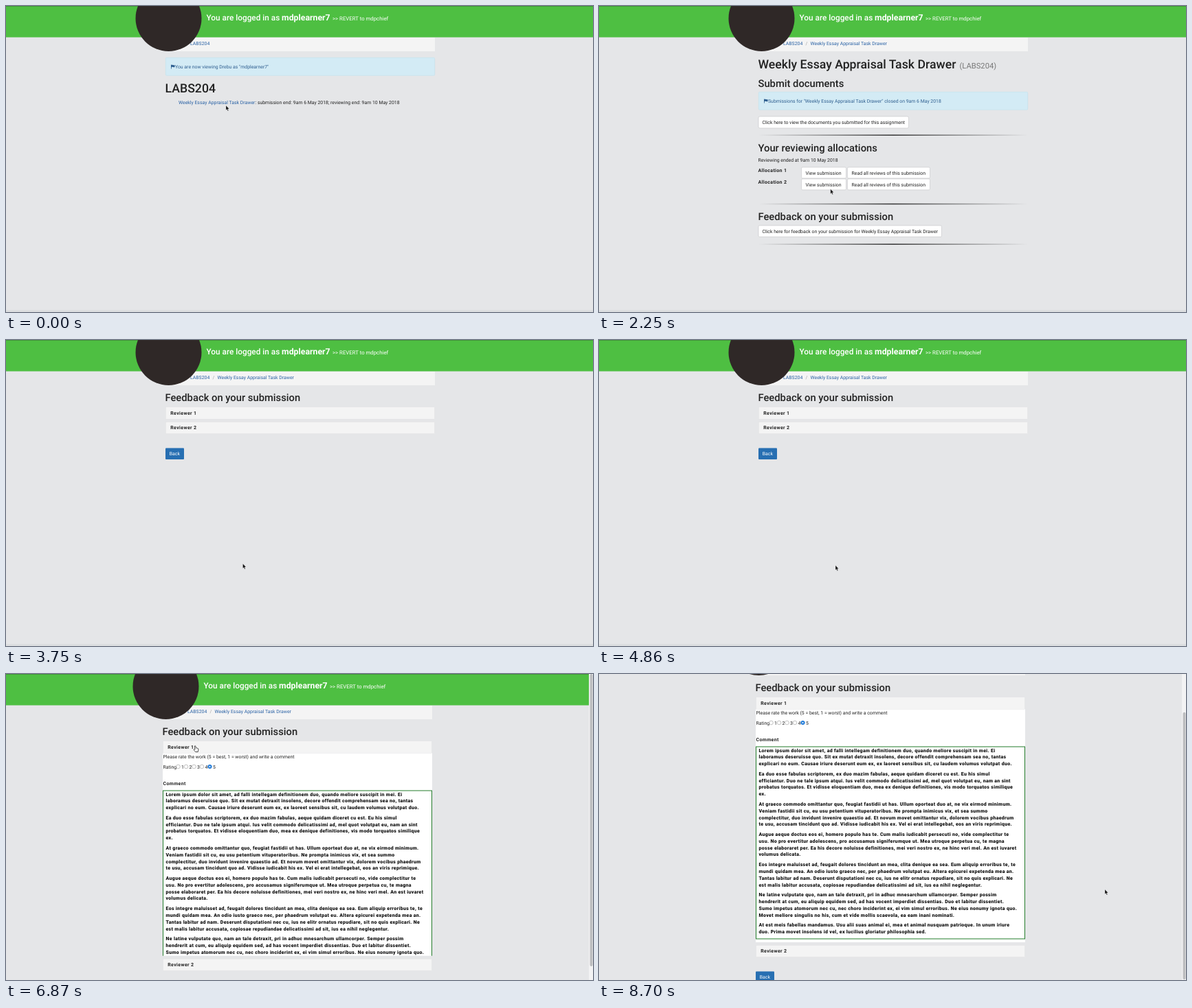
These frames come from a looping animation (854x446 px, 8.73 s). An HTML page:

```html
<!DOCTYPE html>
<html lang="en">
<head>
<meta charset="utf-8">
<style>
html, body { margin: 0; width: 100%; height: 100%; overflow: hidden; background: #e5e6e8; }
svg { display: block; }
text { font: 6.9px Roboto, sans-serif; fill: #222; text-rendering: geometricPrecision; white-space: pre; }
.h1 { font-size: 17.7px; font-weight: 500; }
.h2 { font-size: 14.75px; font-weight: 500; }
.small { font-size: 11.2px; fill: #777; }
.bold { font-size: 7px; font-weight: 700; letter-spacing: .35px; }
.link { fill: #2a62a5; }
.hover { fill: #23527c; text-decoration: underline; }
.note { fill: #2f5f90; }
.head { font-size: 11.8px; font-weight: 500; fill: #fff; }
.user { font-size: 12.3px; font-weight: 700; fill: #fff; }
.revert { font-size: 7.8px; fill: #fff; }
.white { fill: #fff; }
.essay text { font-size: 7px; font-weight: 900; letter-spacing: .31px; fill: #111; }
.alert { fill: #d3ebf5; stroke: #bfe1ec; stroke-width: .6; }
.bar { fill: #f4f4f4; stroke: #e0e0e2; stroke-width: .5; }
.btn { fill: #fff; stroke: #c4c4c6; stroke-width: .6; }
.pressed { fill: #e2e2e2; stroke: #adadad; }
</style>
</head>
<body>
<svg width="854" height="446" viewBox="0 0 854 446">
  <defs>
    <linearGradient id="fade">
      <stop offset="0" stop-color="#333" stop-opacity="0"/>
      <stop offset=".5" stop-color="#333"/>
      <stop offset="1" stop-color="#333" stop-opacity="0"/>
    </linearGradient>
    <path id="flag" d="M0 0h.8v.5q1.2-.7 2.4 0t2.3 0v3q-1.2.6-2.3 0t-2.4 0v2.5h-.8z" fill="#2f5f90"/>
  </defs>
  <rect width="854" height="446" fill="#e5e6e8"/>
  <rect id="foot" y="443" width="854" height="3" fill="#dcdee0"/>

  <g id="scene">
    <rect x="232" y="46" width="392" height="20" fill="#f4f4f4"/>
    <text x="268" y="57.3" class="link">LABS204</text>
    <g id="crumb">
      <text x="300.5" y="57.3" fill-opacity=".4">/</text>
      <text x="307.5" y="57.3" class="link">Weekly Essay Appraisal Task Drawer</text>
    </g>
    <rect x="-10" width="874" height="45.6" fill="#4ebf42"/>
    <rect x="-10" width="874" height="1" fill="#43913b"/>
    <circle cx="236.5" cy="18" r="48" fill="#2f2827"/>
    <text x="291.5" y="20.5" class="head">You are logged in as</text>
    <text x="401" y="20.5" class="user">mdplearner7</text>
    <text x="475" y="20.5" class="revert">&gt;&gt; REVERT to mdpchief</text>

    <g id="course">
      <rect x="232.3" y="75.3" width="391.4" height="26" rx="1.5" class="alert"/>
      <use href="#flag" x="240" y="85.5"/>
      <text x="246" y="91.2" class="note">You are now viewing Drebu as "mdplearner7"</text>
      <text x="231.5" y="126.3" class="h1">LABS204</text>
      <text x="251" y="142.5" class="link" id="task">Weekly Essay Appraisal Task Drawer</text>
      <text x="362.5" y="142.5">: submission end: 9am 6 May 2018; reviewing end: 9am 10 May 2018</text>
    </g>

    <g id="assignment">
      <text x="231.5" y="91.3" class="h1">Weekly Essay Appraisal Task Drawer</text>
      <text x="524.5" y="91.3" class="small">(LABS204)</text>
      <text x="231.5" y="118.3" class="h2">Submit documents</text>
      <rect x="232.3" y="125.3" width="391.4" height="26" rx="1.5" class="alert"/>
      <use href="#flag" x="240" y="135.5"/>
      <text x="246" y="141.2" class="note">Submissions for "Weekly Essay Appraisal Task Drawer" closed on 9am 6 May 2018</text>
      <rect x="232" y="161" width="218.5" height="17" rx="2" class="btn"/>
      <text x="237.5" y="172">Click here to view the documents you submitted for this assignment</text>
      <text x="231.5" y="212.3" class="h2">Your reviewing allocations</text>
      <text x="231.5" y="227.4">Reviewing ended at 9am 10 May 2018</text>
      <g id="allocations"></g>
      <text x="231.5" y="312.3" class="h2">Feedback on your submission</text>
      <rect x="232" y="320" width="266.5" height="16.5" rx="1.5" class="btn" id="feedbackBtn"/>
      <text x="237.5" y="330.8">Click here for feedback on your submission for Weekly Essay Appraisal Task Drawer</text>
      <g fill="url(#fade)">
        <rect x="232" y="187.5" width="392" height="1.5"/>
        <rect x="232" y="287.8" width="392" height="1.5"/>
        <rect x="232" y="346.5" width="392" height="1.5"/>
      </g>
    </g>

    <g id="feedback">
      <text x="231.5" y="89.3" class="h2">Feedback on your submission</text>
      <svg id="panel" x="232" y="115" width="392" height="0">
        <rect width="392" height="340" fill="#fff"/>
        <text x=".5" y="8">Please rate the work (5 = best, 1 = worst) and write a comment</text>
        <text x=".5" y="22.5">Rating</text>
        <g id="rating"></g>
        <text x=".5" y="47.3" class="bold">Comment</text>
        <rect x=".5" y="55" width="391" height="280" fill="none" stroke="#237c2b"/>
        <g id="essay" class="essay"></g>
      </svg>
      <rect x="232.3" y="97.8" width="391.4" height="17.4" class="bar"/>
      <text x="239.3" y="108.8" class="bold">Reviewer 1</text>
      <g id="below">
        <rect x="232.3" y="119.3" width="391.4" height="17.4" class="bar"/>
        <text x="239.3" y="130.4" class="bold">Reviewer 2</text>
        <rect x="232" y="157.5" width="27" height="16.5" rx="1" fill="#276fb2"/>
        <text x="237.8" y="168.2" class="white">Back</text>
      </g>
    </g>
  </g>

  <g id="scrollbar">
    <rect x="848" width="6" height="446" fill="#f3f3f4"/>
    <rect id="thumb" x="849.5" width="4" rx="2" fill="#bdbec0"/>
  </g>
  <g id="ripple">
    <circle r="15.5" fill="#000" fill-opacity=".08"/>
    <circle r="9" fill="#000" fill-opacity=".06"/>
    <g id="flash">
      <circle r="16" fill="#f6f6f6" stroke="#000" stroke-opacity=".22" stroke-width="2"/>
      <circle r="8.5" fill="#dcdcdc"/>
    </g>
  </g>
  <g id="cursor">
    <path id="arrow" d="M0 0V6.8L1.5 5.4 2.6 7.9 3.7 7.4 2.7 5H4.7Z" fill="#111" stroke="#fff" stroke-width=".3"/>
    <path id="hand" d="M-1.2.6Q-.4-.6.3.6L1 3.2 3.5 3.8Q4.6 4.2 4.4 5.6L3.7 9H.2L-2.5 5.8Q-2.3 4.5-.4 5.4Z" fill="#fff" stroke="#222" stroke-width=".8"/>
  </g>
</svg>
<script>
const LOOP = 8730, PANEL = 340, VIEW = 446;
const $ = id => document.getElementById(id);
const show = (id, on) => $(id).style.display = on ? '' : 'none';
const move = (id, x, y) => $(id).setAttribute('transform', `translate(${x} ${y})`);
const ease = (t, from, to) => {
  const p = Math.min(1, Math.max(0, (t - from) / (to - from)));
  return p * p * (3 - 2 * p);
};

const essay = `Lorem ipsum dolor sit amet, ad falli intellegam definitionem duo, quando meliore suscipit in mei. Ei
laboramus deseruisse quo. Sit ex mutat detraxit insolens, decore offendit comprehensam sea no, tantas
explicari no eum. Causae iriure deserunt eum ex, ex laoreet sensibus sit, cu laudem volumus volutpat duo.

Ea duo esse fabulas scriptorem, ex duo mazim fabulas, aeque quidam diceret cu est. Eu his simul
efficiantur. Duo ne tale ipsum atqui. Ius velit commodo delicatissimi ad, mel quot volutpat eu, nam an sint
probatus torquatos. Et vidisse eloquentiam duo, mea ex denique definitiones, vis modo torquatos similique
ex.

At graeco commodo omittantur quo, feugiat fastidii ut has. Ullum oporteat duo at, ne vix eirmod minimum.
Veniam fastidii sit cu, eu usu petentium vituperatoribus. Ne prompta inimicus vix, et sea summo
complectitur, duo invidunt invenire quaestio ad. Et novum movet omittantur vix, dolorem vocibus phaedrum
te usu, accusam tincidunt quo ad. Vidisse iudicabit his ex. Vel ei erat intellegebat, eos an viris reprimique.

Augue aeque doctus eos ei, homero populo has te. Cum malis iudicabit persecuti no, vide complectitur te
usu. No pro evertitur adolescens, pro accusamus signiferumque ut. Mea utroque perpetua cu, te magna
posse elaboraret per. Ea his decore noluisse definitiones, mei veri nostro ex, ne hinc veri mel. An est iuvaret
volumus delicata.

Eos integre maluisset ad, feugait dolores tincidunt an mea, clita denique ea sea. Eum aliquip erroribus te, te
mundi quidam mea. An odio iusto graeco nec, per phaedrum volutpat eu. Altera epicurei expetenda mea an.
Tantas labitur ad nam. Deserunt disputationi nec cu, ius ne elitr ornatus repudiare, sit no quis explicari. Ne
est malis labitur accusata, copiosae repudiandae delicatissimi ad sit, ius ea nihil neglegentur.

Ne latine vulputate quo, nam an tale detraxit, pri in adhuc mnesarchum ullamcorper. Semper possim
hendrerit at cum, eu aliquip equidem sed, ad has vocent imperdiet dissentias. Duo et labitur dissentiet.
Sumo impetus atomorum nec cu, nec choro inciderint ex, ei vim simul erroribus. Ne eius nonumy ignota quo.
Movet meliore singulis no his, cum et vide mollis scaevola, ea eam inani nominati.

At est meis fabellas mandamus. Usu alii suas animal ei, mea et animal nusquam patrioque. In unum iriure
duo. Prima movet insolens id vel, ex lucilius gloriatur philosophia sed.`;

let lineY = 62.5;
for (const line of essay.split('\n')) {
  if (line) $('essay').innerHTML += `<text x="4.5" y="${lineY}">${line}</text>`;
  lineY += line ? 9.8 : 4.9;
}

for (const n of [1, 2, 3, 4, 5]) {
  const x = 11 + n * 11.5, on = n == 5;
  $('rating').innerHTML += `<circle cx="${x}" cy="20" r="2.8" fill="${on ? '#1f7ad8' : '#fff'}" stroke="${on ? '#1f7ad8' : '#999'}" stroke-width=".6"/>
    ${on ? `<circle cx="${x}" cy="20" r="1.1" fill="#fff"/>` : ''}<text x="${x + 4.6}" y="22.5">${n}</text>`;
}

for (const n of [1, 2]) {
  const y = 218 + n * 17;
  $('allocations').innerHTML += `<text x="231.5" y="${y + 7.2}" class="bold">Allocation ${n}</text>
    <rect x="294.5" y="${y}" width="65" height="16" rx="1.5" class="btn"/>
    <text x="300.5" y="${y + 10.6}">View submission</text>
    <rect x="361.5" y="${y}" width="120" height="16" rx="1.5" class="btn"/>
    <text x="367.5" y="${y + 10.6}">Read all reviews of this submission</text>`;
}

// Pointer stops: time, x, y
const path = [[0, 320, 145], [500, 320, 145], [800, 320, 138], [1750, 320, 138], [2550, 344.5, 326],
  [3750, 344.5, 326], [3900, 344, 328.5], [4900, 344, 328.5], [5390, 275.5, 104.5],
  [6900, 275.5, 104.5], [7500, 736, 314], [LOOP, 736, 314]];
// Clicks: time, x, y
const clicks = [[1050, 322, 143], [2985, 344.5, 329.5], [6300, 276, 108]];
const CLICK = 400;

function draw(t) {
  const page = t < 1560 ? 1 : t < 3750 ? 2 : 3;
  show('course', page == 1);
  show('assignment', page == 2);
  show('feedback', page == 3);
  show('crumb', page > 1);
  $('task').classList.toggle('hover', t > 780);
  $('feedbackBtn').classList.toggle('pressed', t > 2500);

  // The opened panel makes the page overflow, which brings in the scrollbar
  const open = PANEL * ease(t, 6600, 6950), height = 171 + open, overflow = height > VIEW;
  const scroll = 64 * ease(t, 7780, 8100);
  $('panel').setAttribute('height', open);
  move('below', 0, open);
  move('scene', overflow ? -4 : 0, -scroll);
  show('foot', !overflow);
  show('scrollbar', overflow);
  $('thumb').setAttribute('y', scroll * VIEW / height);
  $('thumb').setAttribute('height', VIEW * VIEW / height);

  const i = path.findIndex(stop => stop[0] > t);
  const [t0, x0, y0] = path[i - 1], [t1, x1, y1] = path[i];
  const p = ease(t, t0, t1);
  move('cursor', x0 + (x1 - x0) * p, y0 + (y1 - y0) * p);
  const pointing = t > 2480 && t < 3750 || t > 5340 && t < 6960;
  show('hand', pointing);
  show('arrow', !pointing);

  const click = clicks.find(c => t >= c[0] && t < c[0] + CLICK);
  show('ripple', click);
  if (click) {
    const age = (t - click[0]) / CLICK;
    move('ripple', click[1], click[2]);
    $('ripple').setAttribute('opacity', 1 - ease(age, .7, 1));
    $('flash').setAttribute('opacity', 1 - ease(age, .1, .55));
  }
}

function frame() {
  draw(performance.now() % LOOP);
  requestAnimationFrame(frame);
}
frame();
</script>
</body>
</html>
```
